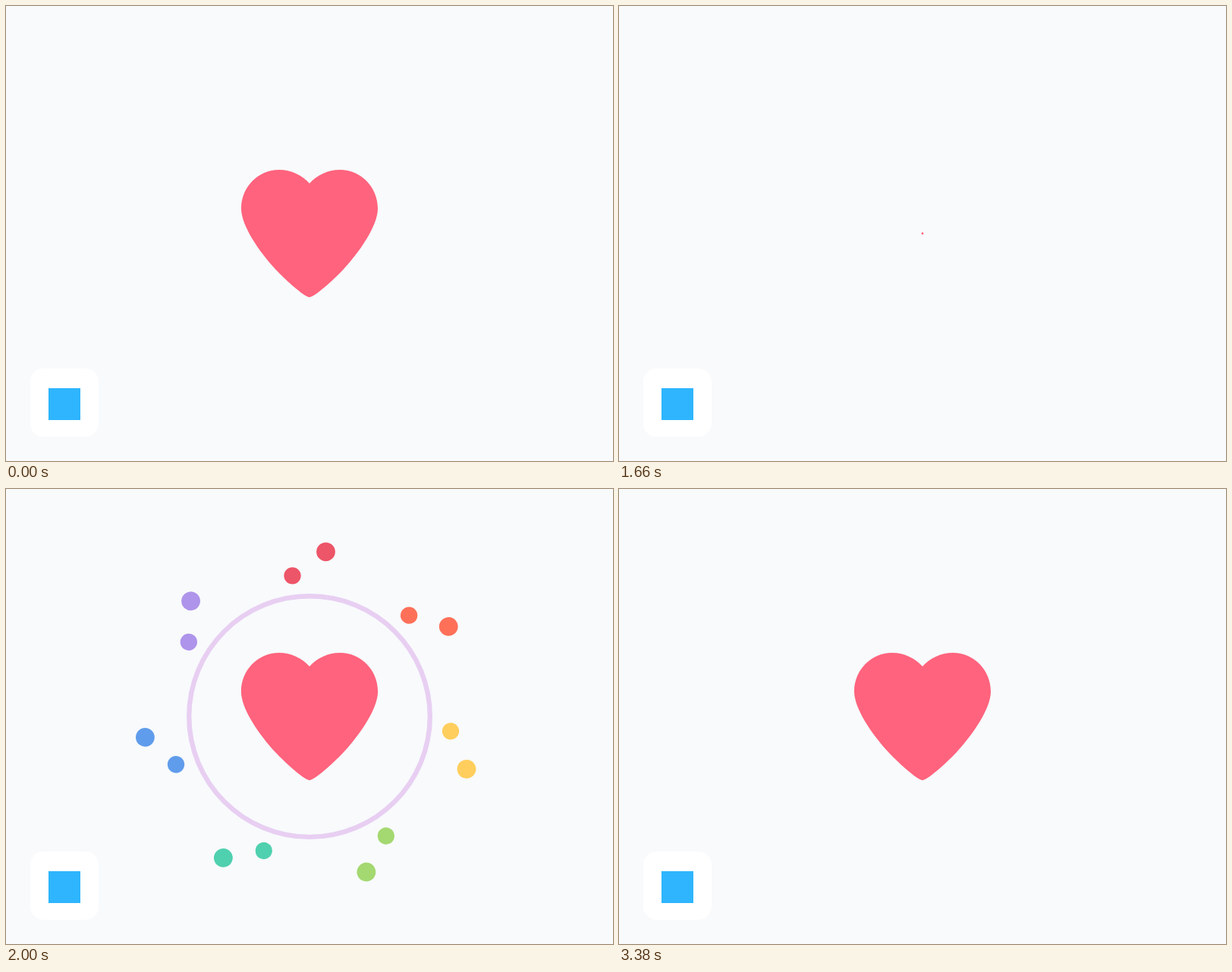
Write an HTML page with a canvas that moves like this. It is 800 px wide and 600 px high and loops after 3400 ms.

```html
<!DOCTYPE html>
<html lang="en">
<head>
<meta charset="utf-8">
<title>Like button</title>
<style>
  html, body { margin: 0; width: 100%; height: 100%; overflow: hidden; background: #f8fafc; }
  canvas { display: block; width: 800px; height: 600px; }
</style>
</head>
<body>
<canvas id="stage" width="800" height="600"></canvas>
<script>
const LOOP = 3400;
const UNLIKE = 65, LIKE = 1660, HOLE = 1790, BURST = 1800, POP = 1823, RING_END = 2040;
const RED = '#ff637d', GREY = '#c7c7d3';
const DOTS = ['#ed5568', '#ff7059', '#ffce5d', '#a4d870', '#4fd0ae', '#609cec', '#ae94ea'];
const RING_COLORS = [
  [1660, [255, 98, 126]],
  [1820, [255, 123, 172]],
  [2000, [232, 207, 242]],
  [2040, [238, 220, 245]]
];

const ctx = document.getElementById('stage').getContext('2d');
const heartPath = new Path2D(
  'M0,-66 C-10,-77 -24,-84 -40,-84 C-68,-84 -90,-61 -90,-33 ' +
  'C-90,-10 -66,24 -45,47 C-30,63 -6,84 0,84 ' +
  'C6,84 30,63 45,47 C66,24 90,-10 90,-33 ' +
  'C90,-61 68,-84 40,-84 C24,-84 10,-77 0,-66 Z');

const clamp = v => Math.min(1, Math.max(0, v));
const progress = (t, start, length) => clamp((t - start) / length);

// Cubic bezier easing with control heights 0 and 1.
function bezier(x1, x2) {
  return x => {
    let lo = 0, hi = 1;
    for (let i = 0; i < 24; i++) {
      const m = (lo + hi) / 2, n = 1 - m;
      if (3 * n * n * m * x1 + 3 * n * m * m * x2 + m * m * m < x) lo = m; else hi = m;
    }
    return lo * lo * (3 - 2 * lo);
  };
}
const easeOut = bezier(0, 0.58);
const easeInOut = bezier(0.42, 0.58);

// Damped spring from 0 to 1: tension 200, friction 15.
function spring(ms) {
  if (ms <= 0) return 0;
  const s = ms / 1000, d = 7.5, w = Math.sqrt(200 - d * d);
  return 1 - Math.exp(-d * s) * (Math.cos(w * s) + d / w * Math.sin(w * s));
}

function ringColor(t) {
  let i = 0;
  while (i < RING_COLORS.length - 2 && t > RING_COLORS[i + 1][0]) i++;
  const [t0, a] = RING_COLORS[i], [t1, b] = RING_COLORS[i + 1];
  const p = progress(t, t0, t1 - t0);
  return `rgb(${a.map((v, k) => Math.round(v + (b[k] - v) * p)).join(',')})`;
}

function disc(x, y, r) {
  if (r <= 0) return;
  ctx.beginPath();
  ctx.arc(x, y, r, 0, Math.PI * 2);
  ctx.fill();
}

function heart(color, scale) {
  if (scale <= 0) return;
  ctx.save();
  ctx.scale(scale, scale);
  ctx.fillStyle = color;
  ctx.fill(heartPath);
  ctx.restore();
}

function burst(t) {
  if (t < BURST) return;
  const s = (t - 1820) / 1000;
  const bigY = -256.5 + 102.5 * Math.exp(-5.3 * s);
  const smallY = -211 + 71 * Math.exp(-5.69 * s);
  const bigR = 13.5 * (1 - easeInOut(progress(t, BURST, 1000)));
  const smallR = 12.5 * (1 - easeInOut(progress(t, BURST, 880)));
  DOTS.forEach((color, i) => {
    ctx.save();
    ctx.rotate(i * Math.PI * 2 / DOTS.length);
    ctx.fillStyle = color;
    disc(21.5, bigY, bigR);
    disc(-22.5, smallY, smallR);
    ctx.restore();
  });
}

function ring(t) {
  if (t < LIKE || t >= RING_END) return;
  const outer = 162 * easeOut(progress(t, LIKE, 190));
  const inner = 162 * easeOut(progress(t, HOLE, RING_END - HOLE));
  if (outer <= inner) return;
  ctx.fillStyle = ringColor(t);
  ctx.beginPath();
  ctx.arc(0, 0, outer, 0, Math.PI * 2);
  ctx.moveTo(inner, 0);
  ctx.arc(0, 0, inner, 0, Math.PI * 2);
  ctx.fill('evenodd');
}

function badge() {
  ctx.fillStyle = '#fff';
  ctx.beginPath();
  ctx.roundRect(32, 478, 90, 90, 17);
  ctx.fill();
  ctx.fillStyle = '#2eb5fd';
  ctx.fillRect(56, 504, 42, 42);
}

function draw(t) {
  ctx.fillStyle = '#f8fafc';
  ctx.fillRect(0, 0, 800, 600);
  badge();
  ctx.save();
  ctx.translate(400, 300);
  burst(t);
  ring(t);
  if (t < UNLIKE) heart(RED, 1);
  else if (t < LIKE) heart(GREY, spring(t - UNLIKE));
  else heart(RED, spring(t - POP));
  ctx.restore();
}

const start = performance.now();
function tick() {
  draw((performance.now() - start) % LOOP);
  requestAnimationFrame(tick);
}
tick();
</script>
</body>
</html>
```
